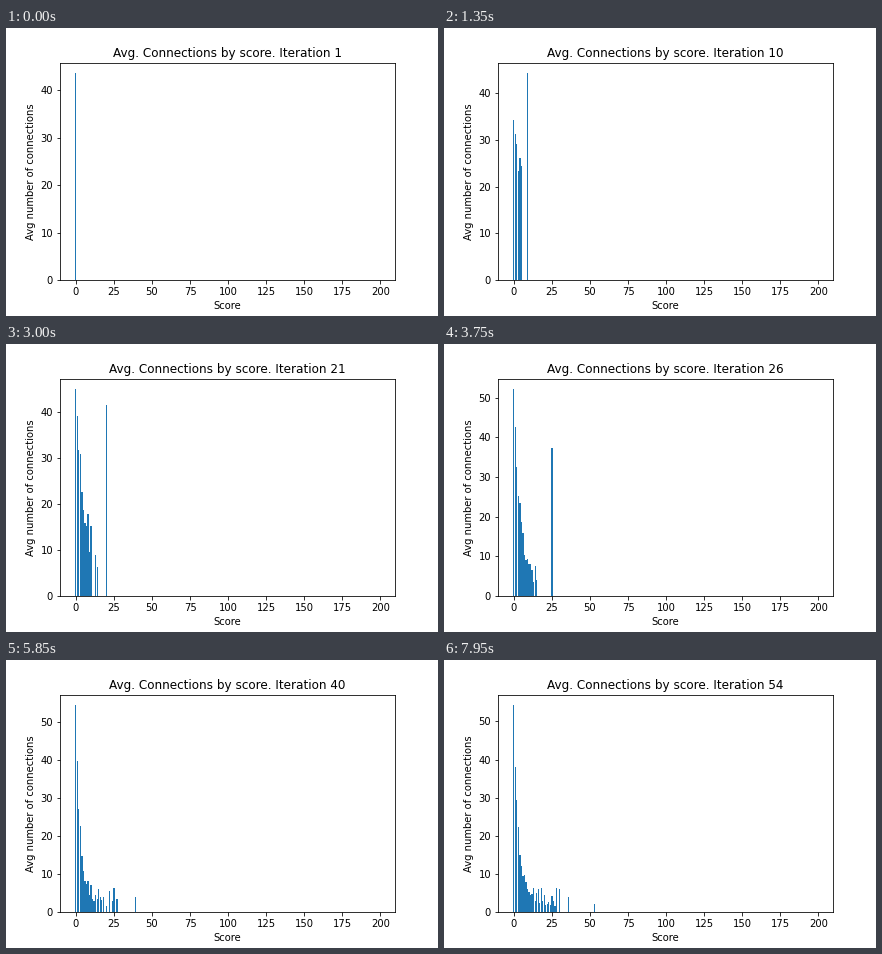
Recreate the animation shown at these times as a matplotlib script. Size 432x288 px, loop 8000 ms.

```python
import numpy as np
import matplotlib.pyplot as plt
from matplotlib.animation import FuncAnimation

FRAME_MS, STEP_MS, LOOP_MS = 50, 150, 8000
LAST = (LOOP_MS - 1) // STEP_MS + 1
TAIL = 4  # level the field decays to

rng = np.random.default_rng(5)
scores = np.arange(LAST)
reach = rng.uniform(0.45, 0.72, LAST)  # share of the run a score may span
phase = rng.uniform(0, 2 * np.pi, LAST)
wobble = 0.6 * np.clip(scores / 20, 0, 1)


def ease(iteration, points):
    """Interpolate between (iteration, value) key points."""
    return np.interp(iteration, *zip(*points))


def heights_at(iteration):
    peak = ease(iteration, [(10, 34.2), (16, 38), (26, 52.2),
                            (35, 54.92), (45, 54.3), (54, 54.33)])
    decay = ease(iteration, [(10, 9), (16, 8), (26, 4), (35, 2.8)])
    leader = ease(iteration, [(1, 43.6), (2, 98), (4, 62), (10, 44.3),
                              (16, 45.8), (26, 37.3), (35, 4.5), (54, 2)])

    field = TAIL + (peak - TAIL) * np.exp(-scores / decay)
    field *= 1 + wobble * np.sin(phase + iteration / 3)
    top = iteration - 1
    present = (scores < reach * iteration) & (scores < top)
    heights = np.where(present, field, 0)
    heights[top] = leader  # the leader scores on every iteration
    return heights


fig = plt.figure(figsize=(6, 4), dpi=72)
fig.subplots_adjust(left=0.125, right=0.9, bottom=0.125, top=0.88)
ax = fig.add_subplot()
bars = ax.bar(scores, np.zeros(LAST))
ax.set_xlim(-10.39, 209.39)
ax.set_xlabel("Score")
ax.set_ylabel("Avg number of connections")
title = ax.set_title("")


def draw(frame):
    iteration = frame * FRAME_MS // STEP_MS + 1
    heights = heights_at(iteration)
    for bar, height in zip(bars, heights):
        bar.set_height(height)
        bar.set_visible(height > 0)
    ax.set_ylim(0, heights.max() * 1.05)
    title.set_text(f"Avg. Connections by score. Iteration {iteration}")
    return [*bars, title]


anim = FuncAnimation(fig, draw, frames=LOOP_MS // FRAME_MS, interval=FRAME_MS,
                     repeat=True, repeat_delay=0)
plt.show()
```
